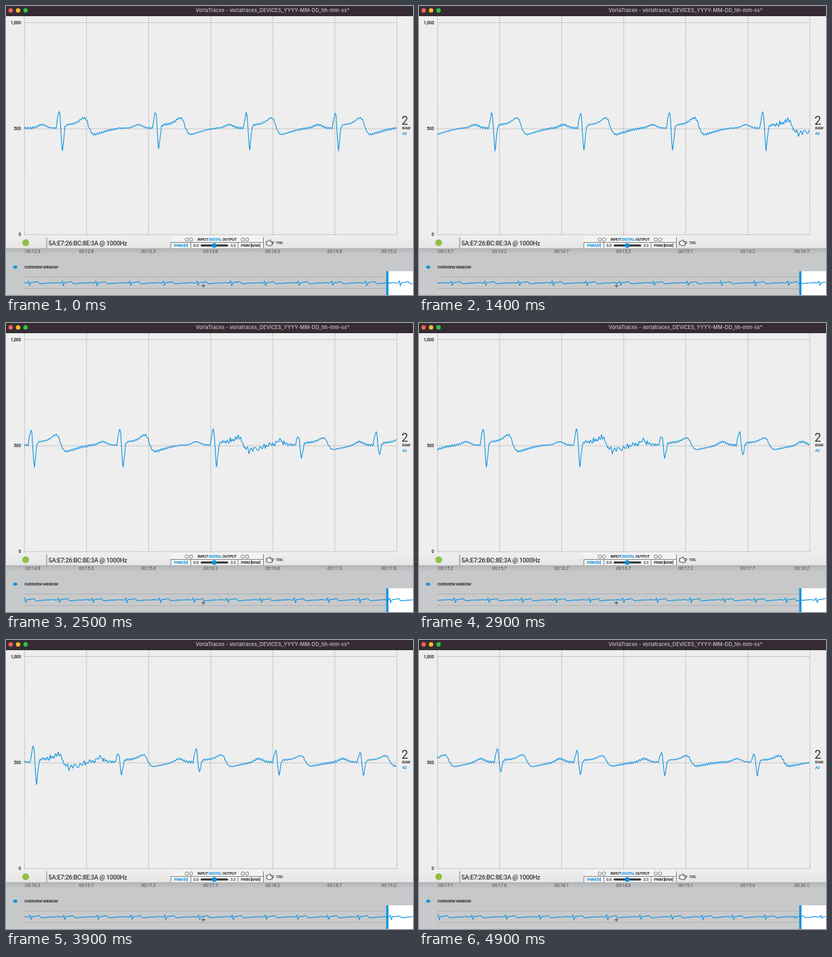
An HTML page that plays this animation: 600 by 426 pixels, repeating every 5 s.

```html
<!DOCTYPE html>
<html lang="en">
<head>
<meta charset="utf-8">
<title>Signal monitor</title>
<style>
html, body { margin: 0; height: 100%; overflow: hidden; background: #c6c7c9; }
svg { display: block; width: 100vw; height: 100vh; }
text { font: 500 6.4px Roboto, "Open Sans", sans-serif; letter-spacing: -.03em; fill: #333; }
.b { font-weight: 700; }
.mid { text-anchor: middle; }
.end { text-anchor: end; }
.blue { fill: #0f93df; }
.title { font: 600 7.45px Inter, sans-serif; letter-spacing: 0; fill: #b9b1b7; }
.small { font-size: 5.9px; letter-spacing: -.06em; }
#labels text { font-size: 6.9px; font-weight: 400; fill: #505154; }
.line { fill: none; stroke: #1494e0; stroke-width: 1.1; stroke-linejoin: round; }
.grid { fill: none; stroke: #949494; stroke-width: .8; stroke-dasharray: 1.6 1.4; }
.thin { fill: none; stroke: #555; stroke-width: .7; }
</style>
</head>
<body>
<svg viewBox="0 0 600 426" preserveAspectRatio="none">
  <defs>
    <linearGradient id="panel" x2="0" y2="1">
      <stop offset="0" stop-color="#b2b3b5"/>
      <stop offset=".13" stop-color="#c6c7c9"/>
      <stop offset="1" stop-color="#c9cacc"/>
    </linearGradient>
    <linearGradient id="bar" x2="0" y2="1">
      <stop offset="0" stop-color="#eee"/>
      <stop offset="1" stop-color="#e6e6e6"/>
    </linearGradient>
  </defs>
  <rect width="600" height="358" fill="#eee"/>
  <rect y="357" width="600" height="69" fill="url(#panel)"/>
  <rect y="339" width="600" height="18" fill="url(#bar)"/>
  <rect width="600" height="15" fill="#352c33"/>
  <circle cx="6.8" cy="6.5" r="3.2" fill="#ff5f57"/>
  <circle cx="17.8" cy="6.5" r="3.2" fill="#febc2e"/>
  <circle cx="28.8" cy="6.5" r="3.2" fill="#28c840"/>
  <text class="title mid" x="393" y="9">VorlaTraces - vorlatraces_DEVICES_YYYY-MM-DD_hh-mm-ss*</text>

  <path class="grid" id="grid"/>
  <g class="end">
    <text class="b" x="22" y="26.8">1,000</text>
    <text class="b" x="22" y="183.3">500</text>
    <text class="b" x="22" y="339.4">0</text>
  </g>
  <path class="line" id="trace"/>
  <text x="583" y="175" style="font-size:17.5px;font-weight:400">2</text>
  <text class="b small" x="584" y="182.3">RAW</text>
  <text class="b small blue" x="584" y="189.6">A2</text>

  <circle cx="29" cy="349" r="5" fill="#8fc043"/>
  <path class="thin" d="M60 341V357"/>
  <text x="62.5" y="353.2" style="font-size:9.3px;letter-spacing:-.035em">5A:E7:26:BC:8E:3A @ 1000Hz</text>
  <rect x="243" y="339" width="136" height="18" fill="#f3f3f3"/>
  <path class="thin" d="M243 348.5H379M243 348.5V357M272.5 348.5V357M342 348.5V357M379.5 341V357"/>
  <g class="thin">
    <circle cx="266.5" cy="344.3" r="2.5"/><circle cx="272.8" cy="344.3" r="2.5"/>
    <circle cx="349" cy="344.3" r="2.5"/><circle cx="355.3" cy="344.3" r="2.5"/>
  </g>
  <text class="b small mid" x="311" y="346.1">INPUT <tspan class="blue">DIGITAL</tspan> OUTPUT</text>
  <text class="b small mid blue" x="258" y="355">PWM [V]</text>
  <text class="small mid" x="280" y="355">0.0</text>
  <path d="M288.5 353H326" stroke="#333" stroke-width="3.2" stroke-linecap="round"/>
  <circle class="blue" cx="307" cy="353" r="3.5"/>
  <text class="small mid" x="334.5" y="355">3.3</text>
  <text class="b small mid" x="360.5" y="355">PWM [RAW]</text>
  <path d="M384 347h2l3-2.2 1.2.6-.6 2h4.8q1.2 1 0 2h-3 1.5q1 .9 0 1.8h-1 .5q.6.9-.4 1.7l-4.5.3-2-1.2H384z"
    fill="#f6f6f6" stroke="#333" stroke-width=".9" stroke-linejoin="round"/>
  <text x="398" y="351.3" style="font-size:5px">TRIG</text>

  <path class="grid" d="M27.5 357V366M575.5 357V366"/>
  <g id="labels"></g>
  <path d="M10 385q3.6-4.8 7.2 0q-3.6 4.8-7.2 0z" class="blue"/>
  <text class="b" x="27" y="387.3" style="font-size:6px;letter-spacing:-.065em">OVERVIEW WINDOW</text>
  <path class="grid" d="M27 399.5H560M27 416.5H560"/>
  <rect x="562" y="391" width="38" height="35" fill="#fff"/>
  <path class="line" id="overview"/>
  <rect class="blue" x="560.5" y="391" width="3.3" height="35"/>
  <path d="M288 412.5h6M291 409.5v6" stroke="#333" stroke-width=".8"/>
</svg>
<script>
const $ = id => document.getElementById(id);
const LEFT = 27, RIGHT = 576, TICK = 91.5, UNIT = 9.15;  // UNIT: pixels per 50 ms of signal
const ZOOM = 0.345;

// position, rise, dip and wave size of every heartbeat
const beats = [
  [78, 25, 36, 1], [220, 24, 32, 1], [354, 22, 33, 1], [485, 22, 34, 1],
  [615.8, 24, 34.5, 1], [753.6, 24, 33, .85], [878.8, 13, 20, .7], [993.6, 20, 15.5, .7],
  [1111, 17, 20, .62], [1235.5, 14, 21, .62], [1372, 12, 21, .62]
];
for (let i = 1; i < 20; i++) beats.unshift([78 - 144 * i, 23, 33, 1]);

// recovery after the spike, as offset and height
const wave = [[9, -2], [12, -5], [22, -6.5], [29, -10], [34, -14.3], [38, -15.2], [41, -12],
  [45, 1], [49, 8.2], [53, 9.5], [60, 7.3], [75, 2.8], [90, 0]];

function lerp(points, x) {
  if (x <= points[0][0]) return points[0][1];
  for (let i = 1; i < points.length; i++) {
    const [a, p] = points[i - 1], [b, q] = points[i];
    if (x <= b) return p + (q - p) * (x - a) / (b - a);
  }
  return points[points.length - 1][1];
}

const shapes = beats.map(([at, up, down, k]) => ({
  at,
  points: [[-4, 0], [-2, -up * .6], [0, -up], [1.6, -up * .82], [4, down * .65], [5.2, down],
    [6.4, down * .65], ...wave.map(([x, y]) => [x, y * k])]
}));

function random(n) {
  const v = Math.sin(n * 127.1) * 43758.5453;
  return v - Math.floor(v);
}

function signal(x) {
  let y = 180;
  for (const { at, points } of shapes) {
    const d = x - at;
    if (d < -60 || d > 95) continue;
    y += lerp(points, d) - 5 * Math.exp(-(((d + 25) / 8.5) ** 2));
  }
  y += Math.sin(x * Math.PI * 2 / 3.66) * (1.05 + .4 * Math.sin(x / 17));
  if (x > 765 && x < 874) {
    const s = x / 1.2, i = Math.floor(s);
    const n = random(i) + (random(i + 1) - random(i)) * (s - i);
    y += (n - .5) * 9 * Math.min(1, (x - 765) / 15, (874 - x) / 15);
  }
  return y;
}

function curve(from, to, f) {
  let d = "M";
  for (let x = from; x <= to; x += .6) d += x.toFixed(1) + " " + f(x).toFixed(2) + " ";
  return d;
}

let grid = "M27 24.5H576M27 181H576M27 337H576";
const labels = [];
for (let i = 0; i < 7; i++) {
  const x = LEFT + i * TICK;
  grid += `M${x + .3} 15V338`;
  const t = document.createElementNS($("labels").namespaceURI, "text");
  t.setAttribute("class", i == 0 ? "" : i == 6 ? "end" : "mid");
  t.setAttribute("x", i == 0 ? 29 : i == 6 ? 575 : x);
  t.setAttribute("y", 364.3);
  labels.push($("labels").appendChild(t));
}
$("grid").setAttribute("d", grid);

// data arrives in 50 ms blocks at a slightly uneven pace
const pace = [[0, 0], [5, 9], [14, 27], [20, 39], [29, 57], [39, 78], [49, 96]];
let shown = -1;

function draw(now) {
  const step = Math.floor(now % 5000 / 100);
  if (step != shown) {
    shown = step;
    const blocks = Math.round(lerp(pace, step)), shift = blocks * UNIT;
    $("trace").setAttribute("d", curve(LEFT, RIGHT, x => signal(x + shift)));
    $("overview").setAttribute("d", curve(LEFT, 600, x =>
      408.3 + (signal(LEFT + (x - 562) / ZOOM + shift) - 180) * .13));
    labels.forEach((t, i) => {
      t.textContent = "00:" + (Math.floor((247 + blocks + 10 * i) / 2) / 10).toFixed(1);
    });
  }
  requestAnimationFrame(() => draw(performance.now() - start));
}
const start = performance.now();
draw(0);
</script>
</body>
</html>
```
